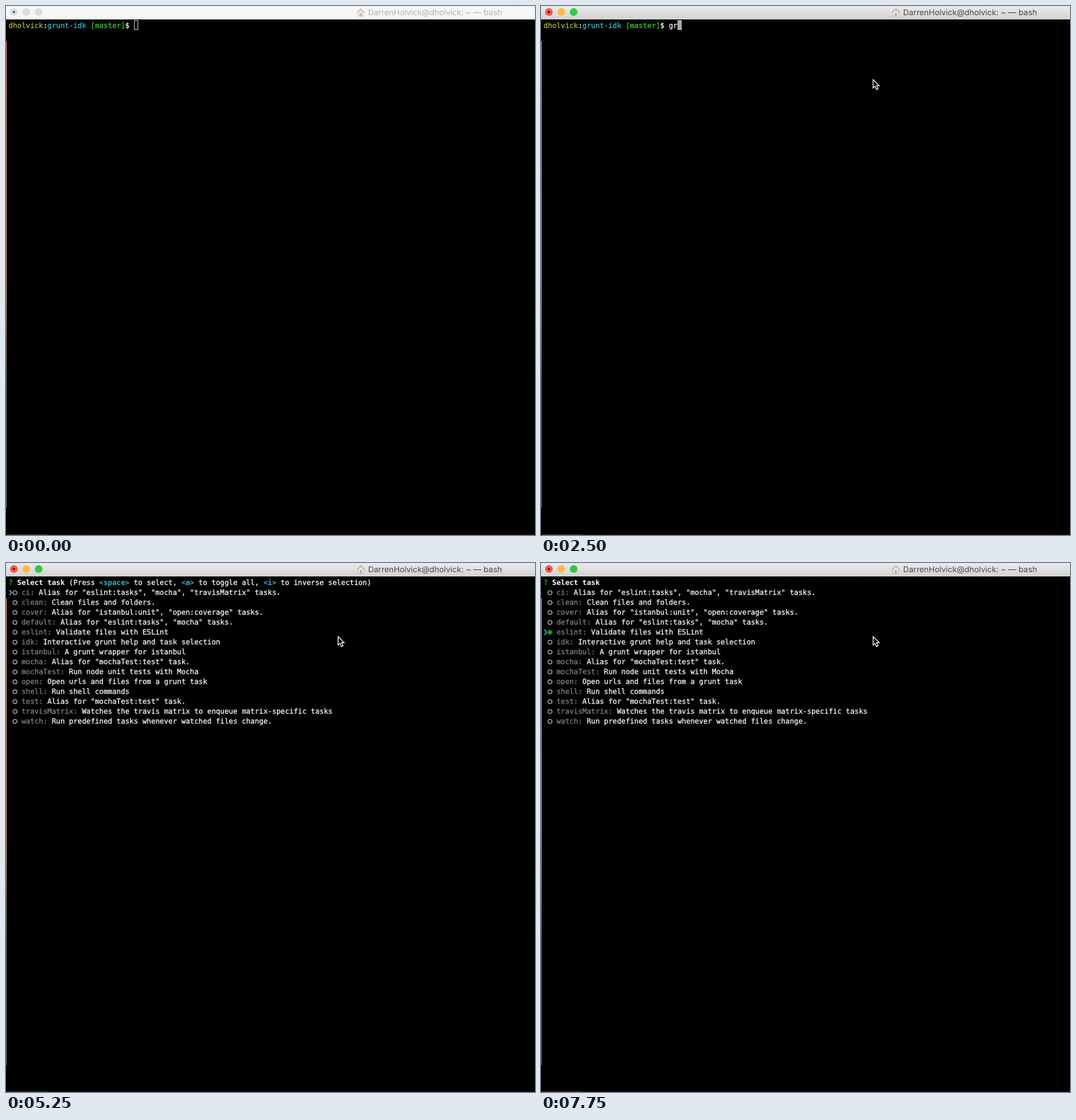
An HTML page with a canvas for the animation above (8 s loop, 748 by 748 pixels).

```html
<!DOCTYPE html>
<html lang="en">
<head>
<meta charset="utf-8">
<title>Terminal</title>
<style>
  html, body { margin: 0; width: 100%; height: 100%; overflow: hidden; background: #000; }
  canvas { display: block; }
</style>
</head>
<body>
<canvas id="stage" width="748" height="748"></canvas>
<script>
const ctx = document.getElementById('stage').getContext('2d');
const SIZE = 748, LOOP = 8000;
const CELL = 6.107, LINE = 14, LEFT = 3.6, BASELINE = 31;
const WHITE = '#f8f8f8', GRAY = '#808080', CYAN = '#33bbc8', GREEN = '#25bc24';

const COMMAND = 'grunt idk';
const TYPING = [[2500, 2], [2750, 4], [3000, 5], [3250, 6], [3500, 8], [3750, 9]];
const POINTER = [[0, [718, -14]], [500, [527, 92]], [750, [469, 103]]];
const ARROW_ROW = [[5250, 0], [6750, 1], [7000, 4]];
const CHOSEN = 4;

const TASKS = [
  ['ci', 'Alias for "eslint:tasks", "mocha", "travisMatrix" tasks.'],
  ['clean', 'Clean files and folders.'],
  ['cover', 'Alias for "istanbul:unit", "open:coverage" tasks.'],
  ['default', 'Alias for "eslint:tasks", "mocha" tasks.'],
  ['eslint', 'Validate files with ESLint'],
  ['idk', 'Interactive grunt help and task selection'],
  ['istanbul', 'A grunt wrapper for istanbul'],
  ['mocha', 'Alias for "mochaTest:test" task.'],
  ['mochaTest', 'Run node unit tests with Mocha'],
  ['open', 'Open urls and files from a grunt task'],
  ['shell', 'Run shell commands'],
  ['test', 'Alias for "mochaTest:test" task.'],
  ['travisMatrix', 'Watches the travis matrix to enqueue matrix-specific tasks'],
  ['watch', 'Run predefined tasks whenever watched files change.']
];

// Latest value whose start time has been reached.
function stepAt(steps, t, initial) {
  return steps.reduce((value, [start, next]) => t >= start ? next : value, initial);
}

function rect(x, y, w, h, fill) {
  ctx.fillStyle = fill;
  ctx.fillRect(x, y, w, h);
}

function disc(x, y, r, fill) {
  ctx.fillStyle = fill;
  ctx.beginPath();
  ctx.arc(x, y, r, 0, Math.PI * 2);
  ctx.fill();
}

function trace(points, close) {
  ctx.beginPath();
  points.forEach(([x, y]) => ctx.lineTo(x, y));
  if (close) ctx.closePath();
}

function stroke(color, width) {
  ctx.strokeStyle = color;
  ctx.lineWidth = width;
  ctx.stroke();
}

function verticalGradient(y0, y1, stops) {
  const gradient = ctx.createLinearGradient(0, y0, 0, y1);
  stops.forEach(([at, color]) => gradient.addColorStop(at, color));
  return gradient;
}

// Writes [text, color, bold] spans on the character grid; a hairline stroke
// gives regular glyphs the heavier look of smoothed terminal type.
function write(row, col, spans) {
  const y = BASELINE + LINE * row;
  for (const [text, color, bold] of spans) {
    ctx.font = `${bold ? 'bold ' : ''}10.15px "DejaVu Sans Mono", monospace`;
    ctx.fillStyle = ctx.strokeStyle = color;
    ctx.lineWidth = 0.25;
    for (const char of text) {
      const x = LEFT + CELL * col++;
      ctx.fillText(char, x, y);
      if (!bold) ctx.strokeText(char, x, y);
    }
  }
}

function drawHouse() {
  trace([[498, 9], [501.7, 5], [505.5, 9], [505.5, 14.5], [498, 14.5]], true);
  ctx.fillStyle = '#ebe6df';
  ctx.fill();
  stroke('#c6beb5', 0.7);
  rect(500.5, 10, 2.5, 4.5, '#b9a292');
  trace([[496, 9.6], [501.7, 4], [507.5, 9.6]]);
  stroke('#c4aea2', 1.3);
}

function drawWindow(active) {
  rect(0, 0, SIZE, SIZE, '#000');
  rect(0, 0, SIZE, 19, active
    ? verticalGradient(0, 19, [[0, '#ebebeb'], [1, '#d2d2d2']])
    : '#f6f6f6');
  const lights = active ? ['#fc5753', '#fdbc40', '#34c84a'] : Array(3).fill('#dcdcdc');
  lights.forEach((color, i) => disc(11.2 + 17.5 * i, 8.5, 5.4, color));
  disc(11.2, 8.5, 1.8, active ? '#5c0f0c' : '#6e6e6e');

  ctx.globalAlpha = active ? 1 : 0.75;
  drawHouse();
  ctx.globalAlpha = 1;
  ctx.font = '11.3px Inter, sans-serif';
  ctx.fillStyle = active ? '#484848' : '#b3b3b3';
  ctx.fillText('DarrenHolvick@dholvick: ~ — bash', 512, 13);

  rect(0, 50, 1, 660, verticalGradient(50, 710,
    [[0, '#d98d62'], [0.5, '#d39752'], [0.65, '#8a7a5c'], [0.76, '#4c6a68'], [1, '#486a6c']]));
  rect(0, 747, SIZE, 1, '#24141a');
  rect(3, 747, 55, 1, '#383838');
}

function drawCaret(row, col, active) {
  const x = Math.round(LEFT + CELL * col), y = 20 + LINE * row;
  if (active) return rect(x, y, 6, 14, '#a9a9a9');
  ctx.beginPath();
  ctx.rect(x + 0.5, y + 0.5, 5, 13);
  stroke('#b5b5b5', 1);
}

function drawPrompt(t, active) {
  const typed = stepAt(TYPING, t, 0);
  write(0, 0, [
    ['dholvick', '#b5b52c'], [':', WHITE], ['grunt-idk', CYAN],
    [' [master]', '#2fd02f'], ['$ ', WHITE], [COMMAND.slice(0, typed), WHITE]
  ]);
  if (t >= 4000) drawCaret(1, 0, active);
  else drawCaret(0, 29 + typed, active);
}

function drawMenu(arrowRow, selected) {
  write(0, 0, [['? ', GREEN], ['Select task', '#fff', true]]);
  if (!selected) {
    write(0, 14, [
      ['(Press ', WHITE], ['<space>', CYAN, true], [' to select, ', WHITE],
      ['<a>', CYAN, true], [' to toggle all, ', WHITE],
      ['<i>', CYAN, true], [' to inverse selection)', WHITE]
    ]);
  }
  TASKS.forEach(([name, about], i) => {
    const y = 42 + LINE * i, checked = selected && i === CHOSEN;
    ctx.beginPath();
    ctx.arc(12.7, y, 2.9, 0, Math.PI * 2);
    stroke(checked ? GREEN : '#dcdcdc', 1);
    if (checked) disc(12.7, y, 1.9, GREEN);
    write(i + 1, 3, [[name + ': ', GRAY], [about, WHITE]]);
    if (i === arrowRow) {
      trace([[4.8, y - 3.8], [8, y], [4.8, y + 3.8]]);
      stroke(CYAN, 1.5);
    }
  });
}

function drawPointer([x, y]) {
  ctx.save();
  ctx.translate(x, y);
  trace([[0.6, 1], [0.6, 13], [3.4, 10.4], [5.3, 15.2], [7.6, 14.2], [5.7, 9.6], [9.3, 9.6]], true);
  ctx.fillStyle = '#000';
  ctx.fill();
  stroke('#fff', 1.1);
  ctx.restore();
}

function render(now) {
  const t = now % LOOP, active = t >= 1000;
  ctx.textRendering = 'geometricPrecision';
  drawWindow(active);
  if (t < 5250) drawPrompt(t, active);
  else if (t < 7250 || t >= 7750) drawMenu(stepAt(ARROW_ROW, t), t >= 7750);
  drawPointer(stepAt(POINTER, t));
  requestAnimationFrame(() => render(performance.now()));
}

render(performance.now());
</script>
</body>
</html>
```
